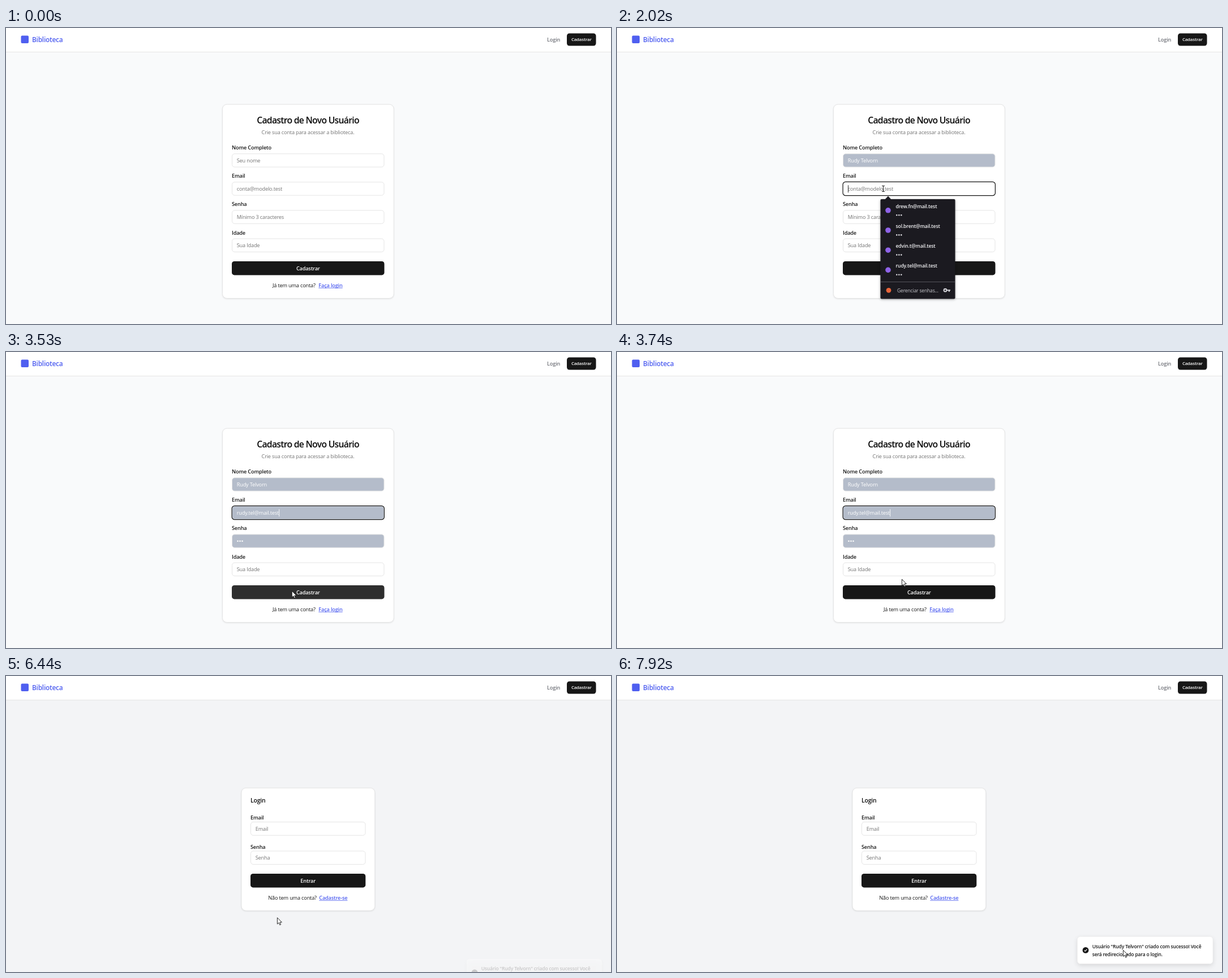
Recreate the animation shown at these times as an HTML page with a canvas. Size 1069 px wide and 524 px high, loop 7990 ms.

```html
<!DOCTYPE html>
<html lang="pt-BR">
<head>
<meta charset="utf-8">
<title>Biblioteca</title>
<style>
  html, body { margin: 0; width: 100%; height: 100%; overflow: hidden; background: #f9fafb; }
  canvas { display: block; }
</style>
</head>
<body>
<canvas id="stage" width="1069" height="524"></canvas>
<script>
const ctx = document.getElementById('stage').getContext('2d');
const LOOP = 7990;
const INK = '#171717', GRAY = '#737373', LINE = '#e5e5e5', ACCENT = '#4f5ff0', FILLED = '#b4bcca', POPUP = '#1b1a20';
const PERSON = 'Rudy Telvorn';
const EMAILS = ['drew.fn@mail.test', 'sol.brent@mail.test', 'edvin.t@mail.test', 'rudy.tel@mail.test'];
const LABELS = ['Nome Completo', 'Email', 'Senha', 'Idade'];
const HINTS = ['Seu nome', 'conta@modelo.test', 'Mínimo 3 caracteres', 'Sua Idade'];
const FIELD = { x: 399, w: 269.5, h: 24.4 };
const fieldY = i => 222.2 + i * 50.1;

// Pointer path: time, x, y
const PATH = [
  [190, 992, 506], [740, 497, 238], [1200, 497, 238], [1270, 498, 257], [1340, 500, 266],
  [1480, 500, 268], [1820, 473, 284], [1950, 470.5, 284.5], [2220, 470.5, 284.5],
  [2780, 508, 380.5], [2850, 507, 385], [2980, 507, 385], [3260, 505, 425], [3480, 505, 425],
  [3740, 503, 402], [3810, 502, 398], [4030, 480, 385], [4170, 478, 384.5], [5430, 478, 384.5],
  [5760, 481, 446], [5970, 479, 427.5], [6440, 479, 427.5], [7140, 432, 307], [7490, 895, 447],
  [7650, 895, 447], [7780, 914, 470], [7920, 894, 485]
];

function pointerAt(t) {
  const i = PATH.findIndex(p => p[0] > t);
  if (i < 0) return PATH[PATH.length - 1].slice(1);
  const [t0, x0, y0] = PATH[i - 1], [t1, x1, y1] = PATH[i];
  const p = (t - t0) / (t1 - t0), k = p * p * (3 - 2 * p);
  return [x0 + (x1 - x0) * k, y0 + (y1 - y0) * k];
}

// CSS "ease" curve
function ease(p) {
  if (p <= 0) return 0;
  if (p >= 1) return 1;
  let lo = 0, hi = 1;
  for (let i = 0; i < 20; i++) {
    const s = (lo + hi) / 2;
    if (.75 * s * (1 - s) + s ** 3 < p) lo = s; else hi = s;
  }
  return .3 * lo * (1 - lo) ** 2 + 3 * (1 - lo) * lo * lo + lo ** 3;
}

const inside = ([px, py], x, y, w, h) => px >= x && px <= x + w && py >= y && py <= y + h;

function box(x, y, w, h, r, fill, stroke, width = 1) {
  ctx.beginPath();
  ctx.roundRect(x, y, w, h, r);
  if (fill) { ctx.fillStyle = fill; ctx.fill(); }
  if (stroke) { ctx.strokeStyle = stroke; ctx.lineWidth = width; ctx.stroke(); }
}

function shadowBox(blur, dy, alpha, ...args) {
  ctx.save();
  ctx.shadowColor = `rgba(0,0,0,${alpha})`;
  ctx.shadowBlur = blur;
  ctx.shadowOffsetY = dy;
  box(...args);
  ctx.restore();
}

function disc(x, y, r, color) {
  ctx.beginPath();
  ctx.arc(x, y, r, 0, 7);
  ctx.fillStyle = color;
  ctx.fill();
}

function shape(points, fill, stroke) {
  ctx.beginPath();
  points.forEach(([x, y]) => ctx.lineTo(x, y));
  ctx.closePath();
  ctx.fillStyle = fill;
  ctx.fill();
  if (stroke) { ctx.strokeStyle = stroke; ctx.lineWidth = .9; ctx.stroke(); }
}

function text(s, x, y, color = INK, weight = 400, size = 9.46, align = 'left', track = -.018) {
  const px = size * .97;
  ctx.font = `${weight} ${px}px "Open Sans", "Noto Sans", sans-serif`;
  ctx.letterSpacing = px * track + 'px';
  ctx.textAlign = align;
  ctx.fillStyle = color;
  ctx.fillText(s, x, y);
  return ctx.measureText(s).width;
}

const dots = (x, y, color) => [0, 4, 8].forEach(d => disc(x + d, y, 1.3, color));

function link(s, x, y) {
  const w = text(s, x, y, ACCENT, 600);
  ctx.fillRect(x, y + 1.3, w, .8);
}

function card(x, y, w, h) {
  shadowBox(3, 1, .12, x, y, w, h, 8, '#fff');
  box(x, y, w, h, 8, '#fff', LINE);
}

function button(s, x, y, w, pointer, h = 24.4, size = 9.46) {
  box(x, y, w, h, 4.5, inside(pointer, x, y, w, h) ? '#2e2e2e' : INK);
  text(s, x + w / 2, y + h / 2 + size * .37, '#fff', 600, size, 'center');
}

function header(pointer) {
  ctx.fillStyle = '#fff';
  ctx.fillRect(0, 0, 1069, 42);
  ctx.fillStyle = LINE;
  ctx.fillRect(0, 42, 1069, 1);
  box(26.5, 13.5, 13.5, 13.5, 2, ACCENT);
  text('Biblioteca', 46, 25, ACCENT, 600, 12.2);
  text('Login', 956, 24, '#6f7178', 600);
  button('Cadastrar', 991, 9.5, 51.5, pointer, 22, 8.1);
}

function field(i, value, focused, caretOn) {
  const { x, w, h } = FIELD, y = fieldY(i), filled = value && i < 3;
  text(LABELS[i], x, y - 7, INK, 600);
  box(x + .5, y + .5, w - 1, h - 1, 4.5, filled ? FILLED : '#fff', LINE);
  if (focused) box(x + .1, y, w - .2, h, 4.8, null, INK, 1.2);
  let width = 0;
  if (i === 2 && value) dots(409.5, y + 12.4, '#fff');
  else {
    width = text(value || HINTS[i], 407.7, y + 15.6, filled ? '#fff' : value ? INK : GRAY);
    if (!value) width = 0;
  }
  if (caretOn) {
    ctx.fillStyle = filled ? '#fff' : INK;
    ctx.fillRect(408 + width, y + 6, .9, 13);
  }
}

function popup(x, y, w, h) {
  shadowBox(4, 1, .35, x, y, w, h, 2, POPUP);
  shape([[473.5, y + .5], [479, y - 5.5], [484.5, y + .5]], POPUP);
}

function loginPopup(row) {
  popup(465.5, 303, 132, 176.5);
  EMAILS.forEach((mail, i) => {
    const y = 305.5 + i * 35.2;
    if (i === row) box(468, y, 127, 35, 4, '#323137');
    disc(479, y + 17.3, 4.8, '#8f63e8');
    text(mail, 492.5, y + 13.3, '#f3f3f5', 600, 8.9);
    dots(494.3, y + 25.7, '#dcdce0');
  });
  ctx.fillStyle = '#55545b';
  ctx.fillRect(466, 449, 131, 1);
  disc(480, 464.3, 4.4, '#e8643a');
  text('Gerenciar senhas...', 495, 467.7, '#c9c9ce', 400, 8.8);
  disc(580, 464.2, 3.4, '#d0d0d5');
  disc(580, 464.2, 1.3, POPUP);
  ctx.fillStyle = '#d0d0d5';
  ctx.fillRect(583, 463.2, 6, 2);
  ctx.fillRect(585.8, 465, 2, 2);
}

function registerPage(t, pointer) {
  const namePopup = t >= 810 && t < 1480;
  const mailPopup = t >= 2020 && t < 3480;
  const row = mailPopup && inside(pointer, 468, 305.5, 127, 140.7) ? Math.floor((pointer[1] - 305.5) / 35.2) : -1;
  const mail = t >= 3480 ? EMAILS[3] : EMAILS[row] || '';
  const age = t < 4890 ? '' : t < 4960 ? '2' : '24';
  const values = [t >= 1340 ? PERSON : '', mail, mail && '•••', age];
  const focus = t < 740 || t >= 5970 ? -1 : t < 1950 ? 0 : t < 4030 ? 1 : 3;
  const caretOn = [[740, 1270], [1480, 2280], [3480, 4560], [4890, 5490]].some(([a, b]) => t >= a && t < b);

  ctx.fillStyle = '#f9fafb';
  ctx.fillRect(0, 0, 1069, 524);
  header(pointer);
  card(382.5, 135.2, 302.7, 343.3);
  text('Cadastro de Novo Usuário', 533.5, 169.3, '#0a0a0a', 600, 16.2, 'center', -.045);
  text('Crie sua conta para acessar a biblioteca.', 533.5, 187.7, GRAY, 400, 9.46, 'center');
  values.forEach((v, i) => field(i, v, i === focus, i === focus && caretOn));
  button('Cadastrar', 399, 413, 269.5, mailPopup ? [0, 0] : pointer);
  text('Já tem uma conta?', 471, 458.5);
  link('Faça login', 552.3, 458.5);

  if (namePopup) {
    popup(465.5, 252.3, 105.5, 30.2);
    if (t >= 1340) box(468, 255, 100.5, 25, 4, '#323137');
    text(PERSON, 473.7, 270.8, '#f3f3f5', 600, 8.7);
  }
  if (mailPopup) loginPopup(row);

  return !(namePopup && pointer[1] > 252) && LABELS.some((_, i) =>
    !(mailPopup && i > 1) && inside(pointer, FIELD.x, fieldY(i), FIELD.w, FIELD.h));
}

function loginPage(t, pointer) {
  ctx.fillStyle = '#f3f4f6';
  ctx.fillRect(0, 0, 1069, 524);
  header(pointer);
  card(416, 198.3, 235.7, 217);
  text('Login', 432, 224.2, '#0a0a0a', 600, 10.8);
  [['Email', 258], ['Senha', 309.4]].forEach(([s, y]) => {
    text(s, 432, y - 3.7, INK, 600);
    box(432.5, y + .5, 202.5, 23.6, 4.5, '#fff', LINE);
    text(s, 440.7, y + 15.8, GRAY);
  });
  button('Entrar', 432, 350, 203.3, pointer);
  text('Não tem uma conta?', 463.3, 395.6);
  link('Cadastre-se', 553.3, 395.6);
  toast(ease((t - 6380) / 400));
  return inside(pointer, 432, 258, 203, 24.4) || inside(pointer, 432, 309.4, 203, 24.4);
}

function toast(k) {
  ctx.save();
  ctx.globalAlpha = k;
  ctx.translate(0, 48.7 * (1 - k));
  shadowBox(8, 3, .12, 813.3, 461.2, 239.7, 48.3, 5.4, '#fff');
  box(813.3, 461.2, 239.7, 48.3, 5.4, '#fff', '#ebebeb', .8);
  disc(828, 485.4, 5.4, INK);
  ctx.beginPath();
  [[825.6, 485.6], [827.3, 487.2], [830.5, 483.6]].forEach(p => ctx.lineTo(...p));
  ctx.strokeStyle = '#fff';
  ctx.lineWidth = 1.1;
  ctx.stroke();
  text(`Usuário "${PERSON}" criado com sucesso! Você`, 839.7, 482, INK, 600, 8.75);
  text('será redirecionado para o login.', 839.7, 495.5, INK, 600, 8.75);
  ctx.restore();
}

function drawPointer([x, y], beam) {
  if (beam) {
    ctx.fillStyle = '#222';
    ctx.fillRect(x - .5, y - 5, 1, 10);
    ctx.fillRect(x - 2.5, y - 5.5, 5, 1);
    ctx.fillRect(x - 2.5, y + 4.5, 5, 1);
    return;
  }
  const arrow = [[0, 0], [0, 11.3], [2.6, 8.9], [4.4, 13], [6.2, 12.2], [4.5, 8.2], [8, 8.2]];
  shape(arrow.map(([dx, dy]) => [x + .4 + dx, y + .3 + dy]), '#fff', '#111');
}

function frame(now) {
  const t = now % LOOP, visible = t >= 190;
  const pointer = visible ? pointerAt(t) : [-50, -50];
  const beam = t < 6370 ? registerPage(t, pointer) : loginPage(t, pointer);
  if (visible) drawPointer(pointer, beam);
  requestAnimationFrame(frame);
}
requestAnimationFrame(frame);
</script>
</body>
</html>
```
